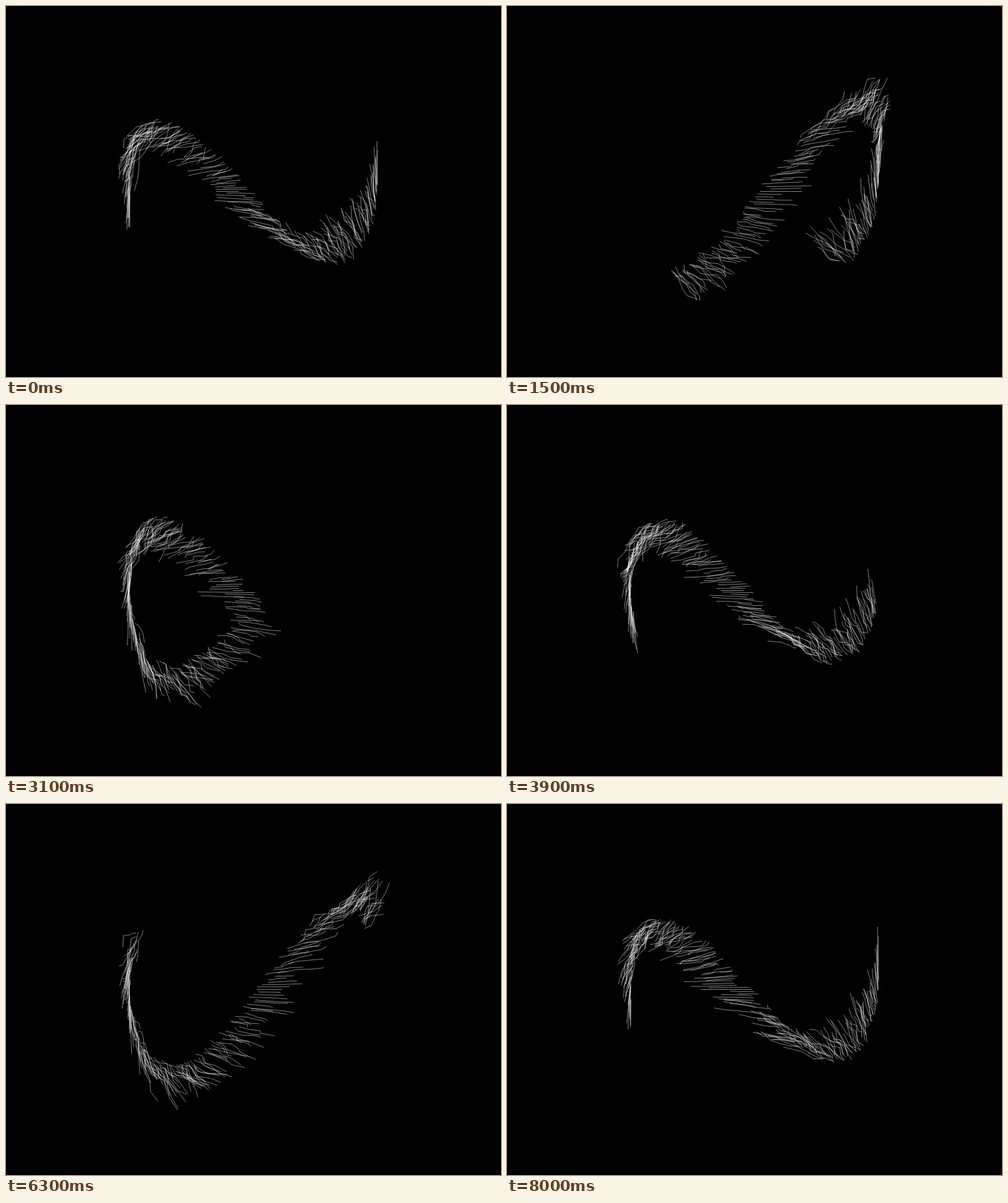
Animation of 700x525 px, one loop 8100 ms. Source, as an HTML page with a canvas:

```html
<!DOCTYPE html>
<html lang="en">
<head>
<meta charset="utf-8">
<title>Strands on a figure eight</title>
<style>
  html, body { margin: 0; width: 100%; height: 100%; overflow: hidden; background: #000; }
  canvas { display: block; }
</style>
</head>
<body>
<canvas id="stage" width="700" height="525"></canvas>
<script>
const ctx = document.getElementById('stage').getContext('2d');
const W = 700, H = 525;
const STEP_MS = 100, STEPS = 81;
const TURN = Math.PI / 20;   // advance of the head per step
const STRANDS = 200, JOINTS = 5, REACH = 22;

// Small seeded generator, so each step always gets the same strands.
function seeded(seed) {
  let s = seed;
  return () => {
    s = (s + 0x6D2B79F5) | 0;
    let r = Math.imul(s ^ (s >>> 15), 1 | s);
    r = (r + Math.imul(r ^ (r >>> 7), 61 | r)) ^ r;
    return ((r ^ (r >>> 14)) >>> 0) / 4294967296;
  };
}

// A random walk leaving the curve; its heading turns with the angle.
function strand(a, rand) {
  let x = W / 2 + W / 4 * Math.cos(a);
  let y = H / 2 - H / 5 * Math.sin(2 * a);
  ctx.beginPath();
  for (let j = 0; j < JOINTS; j++) {
    x += REACH * rand() * Math.sin(a);
    y -= REACH * rand() * Math.cos(a);
    ctx.lineTo(x, y);
  }
  ctx.stroke();
}

function draw(step) {
  const rand = seeded(step * 7919 + 17);
  const head = step * TURN;
  ctx.fillStyle = '#000';
  ctx.fillRect(0, 0, W, H);
  ctx.strokeStyle = 'rgba(255, 255, 255, 0.6)';
  ctx.lineWidth = 0.75;
  for (let i = 0; i <= STRANDS; i++) {
    strand(head - Math.PI * (1 - i / STRANDS), rand);
  }
}

let shown = 0;
const start = performance.now();

function tick() {
  const step = Math.floor((performance.now() - start) / STEP_MS) % STEPS;
  if (step !== shown) draw(shown = step);
  requestAnimationFrame(tick);
}

draw(0);
requestAnimationFrame(tick);
</script>
</body>
</html>
```
